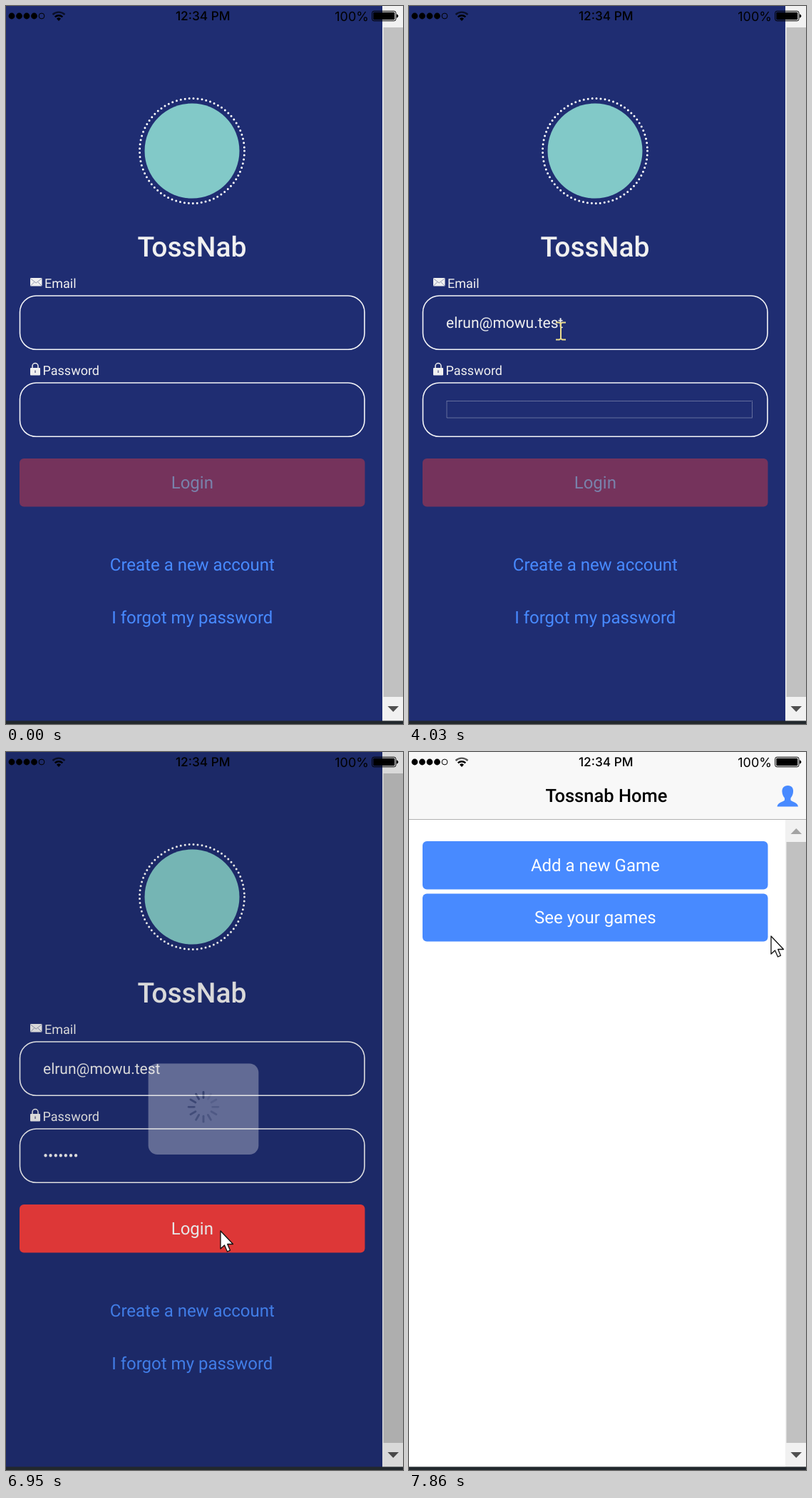
Animation of 557 by 1006 pixels, one loop 8000 ms. Source, as an HTML page:

```html
<!DOCTYPE html>
<html lang="en">
<head>
<meta charset="utf-8">
<title>Login flow</title>
<style>
  html, body { margin: 0; width: 100%; height: 100%; overflow: hidden; background: #1f2d72; }
  svg { display: block; width: 100vw; height: 100vh; }
  text { font-family: Roboto, Arial, sans-serif; white-space: pre; }
  .mid { text-anchor: middle; }
  .pale { fill: #f0f0f0; }
  .label { font-size: 18px; }
  .field { font-size: 21px; }
  .btn { font-size: 24px; }
  .link { fill: #488aff; }
  .title { font-weight: 500; }
  .hint { font-size: 21px; fill: #8f8f94; }
  .box { fill: none; stroke: #f4f5f8; stroke-width: 1.6; }
  .status text { font-family: Inter, Arial, sans-serif; }
  .pointer { fill: #fff; stroke: #111; stroke-width: 1.3; stroke-linejoin: round; }
</style>
</head>
<body>
<svg viewBox="0 0 557 1006" preserveAspectRatio="none" text-rendering="geometricPrecision">
  <g id="login">
    <rect width="557" height="1006" fill="#1f2d72"/>
    <circle cx="261" cy="203" r="66.5" fill="#82c9c8"/>
    <circle cx="261" cy="203" r="73.5" fill="none" stroke="#fff" stroke-width="3" stroke-linecap="round" stroke-dasharray="0 5.998"/>
    <text class="mid pale title" x="261" y="351" font-size="39">TossNab</text>

    <rect class="pale" x="34" y="381" width="16.5" height="11.5" rx="1"/>
    <path d="M34.5 382l7.7 6 7.7-6M34.5 392l5.5-5.5M50 392l-5.500-5.500" fill="none" stroke="#8d93ae" stroke-width=".9"/>
    <text class="pale label" x="54" y="394.500">Email</text>
    <rect class="box" x="19.500" y="406" width="483.500" height="75.300" rx="23"/>
    <text id="mail" class="pale field" x="52" y="451"></text>
    <path id="squiggle" fill="none" stroke="#f01818" stroke-width="1.400"/>
    <g id="mailHint">
      <rect x="19" y="482" width="485" height="66" fill="#fff"/>
      <text class="hint" x="42.500" y="523">Please enter a valid email.</text>
    </g>

    <g id="lower">
      <path d="M37 508v-3.500a4 4 0 0 1 8 0V508" fill="none" stroke="#f0f0f0" stroke-width="1.500"/>
      <rect class="pale" x="34" y="507" width="14" height="10.500" rx="1"/>
      <path d="M41 510.500v3.500" stroke="#77799a" stroke-width="1.600"/>
      <text class="pale label" x="51.500" y="516.500">Password</text>
      <rect class="box" x="19.500" y="528" width="483.500" height="75.300" rx="23"/>
      <rect id="focus" x="53" y="553.500" width="428.500" height="23.500" fill="none" stroke="#a9aec8" stroke-dasharray="1 1"/>
      <text id="pass" class="pale field" x="52" y="572.500"></text>
      <g id="passHint">
        <rect x="19" y="604" width="485" height="66" fill="#fff"/>
        <text class="hint" x="42.500" y="645">Please enter a valid password.</text>
      </g>
      <g id="actions">
        <g id="submit">
          <rect id="submitFill" x="19" y="634" width="484.500" height="67.500" rx="6" fill="#f53d3d"/>
          <text class="mid btn" x="261.300" y="676" fill="#fff">Login</text>
        </g>
        <text class="mid btn link" x="261.300" y="791">Create a new account</text>
        <text class="mid btn link" x="261.300" y="865">I forgot my password</text>
      </g>
    </g>
    <rect id="caret" width="1.500" height="26" fill="#fff"/>

    <rect x="528" width="29" height="1002" fill="#f1f1f1"/>
    <rect id="thumb" x="529.500" y="30" width="27.500" height="938" fill="#c1c1c1"/>
    <path d="M535.500 981h15.500l-7.750 8z" fill="#505050"/>
  </g>

  <g id="home">
    <rect width="557" height="1006" fill="#fff"/>
    <rect width="557" height="94" fill="#f8f8f8"/>
    <rect y="94" width="557" height="1" fill="#b2b2b2"/>
    <text class="mid title" x="277" y="70" font-size="25.500">Tossnab Home</text>
    <path d="M531.500 47c5.500 0 8 3.800 7.500 9-.2 3.500-1.700 6.500-3.500 8.500v3c1.500 2.500 9.500 2.500 10.500 9h-29.500c1-6.500 9-6.500 10.500-9v-3c-1.800-2-3.300-5-3.500-8.500-.5-5.200 2.500-9 8-9z" fill="#488aff"/>
    <g fill="#488aff">
      <rect x="19" y="125" width="484.500" height="67.500" rx="6"/>
      <rect x="19" y="198.500" width="484.500" height="67" rx="6"/>
    </g>
    <text class="mid btn" x="261.300" y="167" fill="#fff">Add a new Game</text>
    <text class="mid btn" x="261.300" y="240" fill="#fff">See your games</text>
    <rect x="528" y="95" width="29" height="907" fill="#f1f1f1"/>
    <rect x="529.500" y="126" width="27.500" height="842" fill="#c1c1c1"/>
    <path d="M535.500 115h15.500l-7.750-8z" fill="#a3a3a3"/>
    <path d="M535.500 981h15.500l-7.750 8z" fill="#505050"/>
  </g>

  <g class="status">
    <circle cx="8" cy="14" r="4.400"/><circle cx="18.500" cy="14" r="4.400"/>
    <circle cx="29" cy="14" r="4.400"/><circle cx="39.500" cy="14" r="4.400"/>
    <circle cx="50" cy="14" r="3.900" fill="none" stroke="#000"/>
    <g fill="none" stroke="#000" stroke-width="2.400">
      <path d="M65.500 12a12.500 12.500 0 0 1 17 0" stroke-opacity=".65"/>
      <path d="M68.700 15.300a8 8 0 0 1 10.600 0"/>
    </g>
    <path d="M71 17.700a4.500 4.500 0 0 1 6 0L74 21z"/>
    <text class="mid" x="276.300" y="19.500" font-size="17.300" font-weight="500">12:34 PM</text>
    <text x="509" y="20.500" font-size="18" text-anchor="end">100%</text>
    <rect x="513.700" y="7.200" width="33.300" height="13.600" rx="2.500" fill="none" stroke="#000"/>
    <rect x="515.300" y="8.800" width="30" height="10.400" rx="1"/>
    <path d="M548 11.300q2.500 1 2.500 2.700t-2.500 2.700z"/>
  </g>

  <rect id="shade" width="557" height="1002"/>
  <g id="loader">
    <rect x="204.500" y="440.500" width="145" height="119.500" rx="12" fill="#f8f8f8"/>
    <g id="spinner" stroke="#69717d" stroke-width="2.700" stroke-linecap="round"></g>
  </g>
  <rect y="1001.500" width="557" height="4.500" fill="#22282d"/>

  <g id="cursor">
    <path id="arrow" class="pointer" d="M0 0V25L5.500 20 9.500 29 13.500 27.200 9.700 18.500H17.500Z"/>
    <path id="hand" class="pointer" d="M-2.500 2Q-2.500-.5 0-.5T2.500 2V11Q5 9.500 7 12 9.500 11 11 14 15 13 15.500 17V23Q15.500 27 12 30V34H-1V31Q-6 26-9.500 20-10 16.500-6.500 16.500L-2.500 20ZM2.500 11V17M7 12V17.500M11 14V18.500"/>
    <path id="beam" d="M-7-11.500H-2L0-10 2-11.500H7M-7 12.500H-2L0 11 2 12.500H7M0-10V11" fill="none" stroke="#eadc8d" stroke-width="2"/>
  </g>
</svg>
<script>
const LOOP = 8000, SHIFT = 66, HOME_AT = 7530;
const MAIL = 'elrun@mowu.test';
const mailKeys = [1250, 1320, 1390, 1530, 1600, 1880, 2020, 2160, 2230, 2370, 2510, 2860, 3070, 3140, 3210];
const passKeys = [4240, 4310, 4380, 4520, 4660, 4870, 5080];
// time, x, y of the pointer
const path = [
  [70, 550, 520], [210, 490, 488], [420, 290, 460], [630, 213, 455], [5490, 213, 455],
  [5630, 255, 645], [5700, 270, 701], [5770, 274, 701], [5980, 295, 678], [6120, 301, 671],
  [7440, 301, 671], [7580, 351, 618], [7720, 510, 259], [7860, 508, 258]
];

const el = {};
document.querySelectorAll('[id]').forEach(n => el[n.id] = n);
const show = (n, on) => n.style.display = on ? '' : 'none';
const within = (t, a, b) => t >= a && t < b;
const ramp = (t, a, b) => Math.min(1, Math.max(0, (t - a) / (b - a)));
const typed = (keys, t) => keys.filter(k => k <= t).length;
const move = (n, y) => n.setAttribute('transform', `translate(0 ${y})`);
const setText = (n, s) => { if (n.textContent !== s) n.textContent = s; };

const spokes = Array.from({ length: 12 }, (_, i) => {
  const line = document.createElementNS('http://www.w3.org/2000/svg', 'path');
  line.setAttribute('d', 'M0-12V-19.500');
  line.setAttribute('transform', `translate(277 497.500) rotate(${i * 30})`);
  return el.spinner.appendChild(line);
});

function pointAt(t) {
  const i = path.findIndex(p => p[0] > t);
  if (i < 1) return path[path.length - 1].slice(1);
  const [a, b] = [path[i - 1], path[i]];
  const k = ramp(t, a[0], b[0]);
  return [a[1] + (b[1] - a[1]) * k, a[2] + (b[2] - a[2]) * k];
}

function cursorKind(t, x, y) {
  if (x < 19 || x > 503.5 || within(t, 6950, HOME_AT)) return 'arrow';
  if (t >= HOME_AT) return within(y, 125, 265) ? 'hand' : 'arrow';
  if (within(y, 406, 482) || within(y, 528, 604)) return 'beam';
  return within(y, 634, 702) ? 'hand' : 'arrow';
}

function drawSquiggle() {
  const end = 52 + el.mail.getSubStringLength(0, 5);
  let d = 'M52 456.500';
  for (let x = 54, up = true; x <= end; x += 2, up = !up) d += `L${x} ${up ? 454 : 456.5}`;
  el.squiggle.setAttribute('d', d);
}

function drawLogin(t) {
  setText(el.mail, MAIL.slice(0, typed(mailKeys, t)));
  setText(el.pass, '•'.repeat(typed(passKeys, t)));

  const badMail = within(t, 1250, 3140), badPass = within(t, 4240, 4870);
  show(el.mailHint, badMail);
  show(el.passHint, badPass);
  move(el.lower, badMail ? SHIFT : 0);
  move(el.actions, badPass ? SHIFT : 0);

  const spell = within(t, 1880, 3620);
  show(el.squiggle, spell);
  if (spell) drawSquiggle();

  show(el.focus, within(t, 3620, 6740));
  const inMail = within(t, 700, 1180) || within(t, 1250, 3620);
  const inPass = within(t, 3620, 4030) || within(t, 4240, 5560) || within(t, 6050, 6530);
  show(el.caret, inMail || inPass);
  const field = inMail ? el.mail : el.pass;
  el.caret.setAttribute('x', 52 + field.getComputedTextLength());
  el.caret.setAttribute('y', inMail ? 431 : 552);

  el.submit.style.opacity = .4 + .6 * ramp(t, 4850, 4950);
  el.submitFill.setAttribute('fill', within(t, 6740, 6810) ? '#e13838' : '#f53d3d');
  el.thumb.setAttribute('fill', within(t, 70, 140) ? '#a8a8a8' : '#c1c1c1');
}

function drawLoader(t) {
  const fadeIn = ramp(t, 6910, 7100), fadeOut = ramp(t, 7330, 7510);
  const on = within(t, 6940, 7510);
  show(el.shade, on);
  show(el.loader, on);
  if (!on) return;
  const level = Math.sin(fadeIn * Math.PI / 2) * (1 - fadeOut);
  const scale = 1 + .1 * (1 - Math.sin(fadeIn * Math.PI / 2)) - .1 * fadeOut;
  el.shade.style.opacity = .3 * level;
  el.loader.style.opacity = .95 * level;
  el.loader.setAttribute('transform', `translate(277 500) scale(${scale}) translate(-277 -500)`);
  const head = 2 + (t - 7090) * 12 / 1000;
  spokes.forEach((s, i) => s.style.opacity = 1 - .85 * ((((head - i) % 12) + 12) % 12) / 12);
}

function draw(t) {
  const home = t >= HOME_AT;
  show(el.home, home);
  show(el.login, !home);
  if (!home) drawLogin(t);
  drawLoader(t);

  const [x, y] = pointAt(t), kind = cursorKind(t, x, y);
  show(el.cursor, t >= 70);
  el.cursor.setAttribute('transform', `translate(${x} ${y})`);
  ['arrow', 'hand', 'beam'].forEach(k => show(el[k], k === kind));
}

const start = performance.now();
function tick() {
  draw((performance.now() - start) % LOOP);
  requestAnimationFrame(tick);
}
tick();
</script>
</body>
</html>
```
